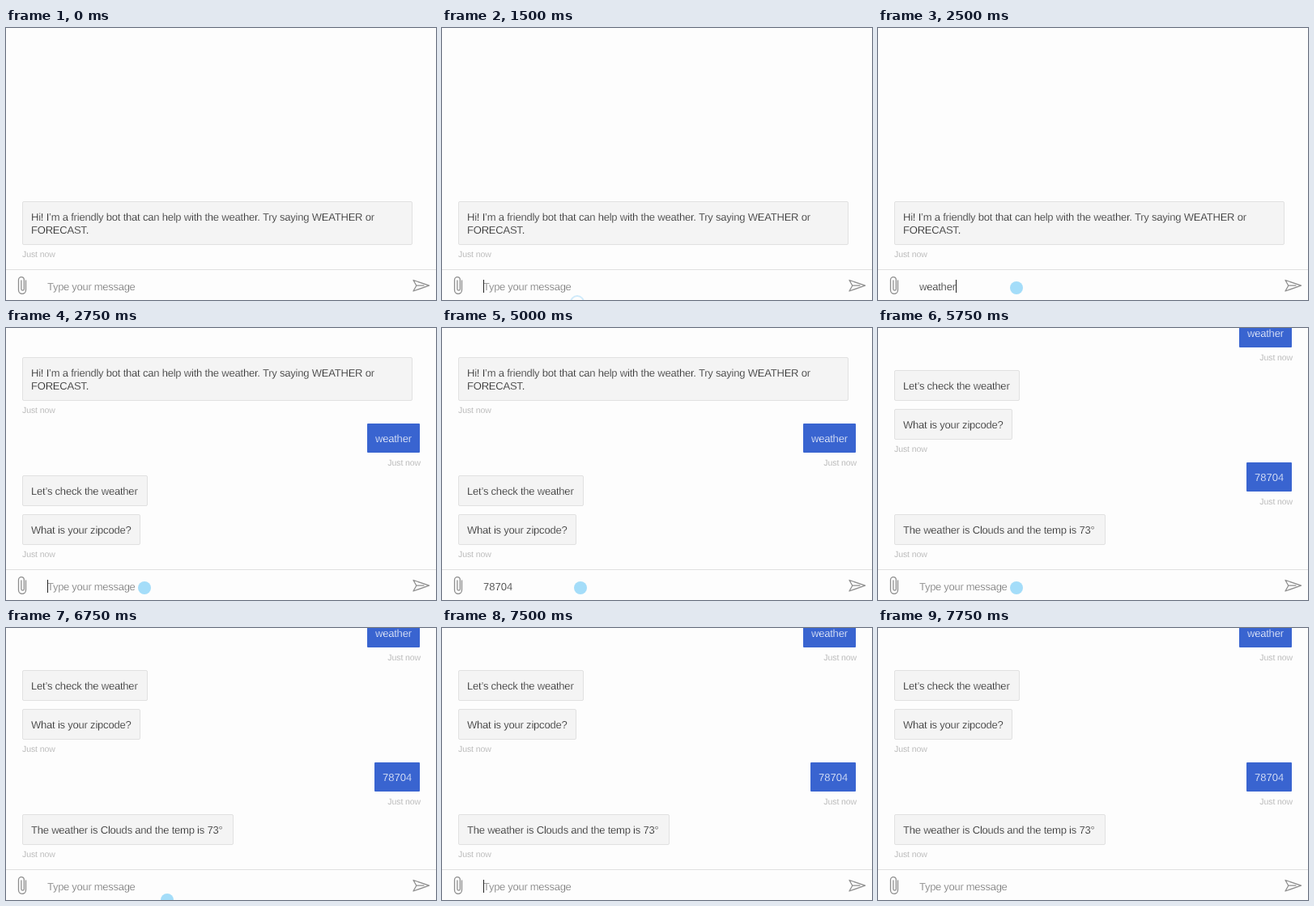
These frames come from a looping animation (531 by 336 pixels, 9250 ms). An HTML page:

```html
<!DOCTYPE html>
<html lang="en">
<head>
<meta charset="utf-8">
<title>Weather bot chat</title>
<style>
  html, body { margin: 0; width: 100%; height: 100%; overflow: hidden; background: #fdfdfd; }
  svg { display: block; }
  /* A thin stroke in the backdrop colour gives the letters a light weight. */
  text {
    font: 13px "Liberation Sans", Arial, sans-serif;
    letter-spacing: -.21px;
    text-rendering: geometricPrecision;
    fill: #262626;
    stroke: #f4f4f4;
    stroke-width: .25px;
  }
  .digits { letter-spacing: 0; }
  .time { font-size: 10.5px; letter-spacing: -.1px; fill: #a2a2a2; stroke: #fdfdfd; }
  .right { text-anchor: end; }
  .bot { fill: #f4f4f4; stroke: #e1e1e1; }
  .user { fill: #3964d0; }
  .userText { fill: #fff; stroke: #3964d0; }
  #input { stroke: #fdfdfd; }
  .hint { fill: #747474; letter-spacing: -.29px; }
  .icon { fill: none; stroke: #8e8e8e; stroke-width: 1.3; stroke-linejoin: round; stroke-linecap: round; }
</style>
</head>
<body>
<svg width="531" height="336" viewBox="0 0 531 336">
  <g id="chat"></g>
  <rect y="298" width="531" height="38" fill="#fdfdfd"/>
  <rect y="298" width="531" height="1" fill="#e0e0e0"/>
  <path class="icon" d="M24.5 312V323.8a4.5 4.5 0 0 1-9 0V311a3.4 3.4 0 0 1 6.8 0V322.5a1.7 1.7 0 0 1-3.4 0V312"/>
  <path class="icon" d="M503 311.5L522.5 318.2L503 325L506.8 318.2ZM506.8 318.2H516"/>
  <text id="input" x="51" y="324"></text>
  <rect id="caret" y="311" width="1" height="16" fill="#222"/>
  <circle id="dot"/>
</svg>
<script>
const LOOP = 9250;
const byId = id => document.getElementById(id);
const [chat, input, caret, dot] = ['chat', 'input', 'caret', 'dot'].map(byId);

function add(parent, tag, attrs, content = '') {
  const node = document.createElementNS('http://www.w3.org/2000/svg', tag);
  for (const key in attrs) node.setAttribute(key, attrs[key]);
  node.textContent = content;
  parent.append(node);
  return node;
}

const group = start => Object.assign(add(chat, 'g', {}), { start });

function botBubble(parent, y, width, lines) {
  add(parent, 'rect', { class: 'bot', x: 20.5, y: y + .5, width: width - 1, height: 21 + 16 * lines.length, rx: 1.5 });
  lines.forEach((line, i) => add(parent, 'text', { x: 31, y: y + 24 + 16 * i }, line));
}

function userBubble(parent, y, width, line, kind = '') {
  add(parent, 'rect', { class: 'user', x: 511 - width, y, width, height: 36, rx: 1 });
  add(parent, 'text', { class: 'userText ' + kind, x: 521 - width, y: y + 23 }, line);
}

const botTime = (parent, y) => add(parent, 'text', { class: 'time', x: 20, y }, 'Just now');
const userTime = (parent, y) => add(parent, 'text', { class: 'time right', x: 512, y }, 'Just now');

const greeting = group(0);
botBubble(greeting, 36, 482, ['Hi! I’m a friendly bot that can help with the weather. Try saying WEATHER or', 'FORECAST.']);
botTime(greeting, 105);

const question = group(2750);
userBubble(question, 118, 65, 'weather');
userTime(question, 170);
botBubble(question, 182, 155, ['Let’s check the weather']);
botBubble(question, 230, 146, ['What is your zipcode?']);
botTime(question, 283);

const zip = group(5250);
userBubble(zip, 296, 56, '78704', 'digits');
const status = userTime(zip, 348);

const answer = group(5750);
botBubble(answer, 360, 261, ['The weather is Clouds and the temp is 73°']);
botTime(answer, 413);

// Each track lists [start in ms, value]; a value holds until the next one.
const scrollTrack = [[0, -178], [2750, 0], [5250, 65], [5750, 130]];
const typedTrack = [
  [0, ''], [1750, 'we'], [2000, 'wea'], [2250, 'weath'], [2500, 'weather'],
  [2750, ''], [4250, '7870'], [4500, '78704'], [5250, '']
];
const caretTrack = [
  [0, false], [1250, true], [3250, false], [3750, true], [5000, false], [5250, true],
  [5750, false], [6250, true], [6750, false], [7250, true], [7750, false]
];
const dotTrack = [
  [0, null], [250, [240, 206]], [500, [172, 337]], [750, [172, 324]], [1000, [166, 338]],
  [1500, [167, 339, 'ring']], [1750, null], [2000, [171, 321]], [6750, [199, 336]], [7000, null]
];
const valueAt = (track, t) => track.findLast(([start]) => start <= t)[1];
const show = (node, visible) => node.setAttribute('visibility', visible ? 'visible' : 'hidden');

function draw(t) {
  chat.setAttribute('transform', `translate(0 ${-valueAt(scrollTrack, t)})`);
  for (const part of chat.children) show(part, t >= part.start);
  status.textContent = t < 5750 ? 'Sending' : 'Just now';

  const typed = valueAt(typedTrack, t);
  input.textContent = typed || 'Type your message';
  input.setAttribute('class', !typed ? 'hint' : /^\d/.test(typed) ? 'digits' : '');
  caret.setAttribute('x', 51 + (typed ? Math.round(input.getComputedTextLength()) : 0));
  show(caret, valueAt(caretTrack, t));

  const spot = valueAt(dotTrack, t);
  show(dot, spot);
  if (spot) {
    const [cx, cy, ring] = spot;
    const look = { cx, cy, r: 8, fill: ring ? '#fdfdfd' : '#a4ddf9', stroke: ring ? '#cfeafa' : 'none', 'stroke-width': 2 };
    for (const key in look) dot.setAttribute(key, look[key]);
  }
}

const begin = performance.now();
function tick() {
  draw((performance.now() - begin) % LOOP);
  requestAnimationFrame(tick);
}
tick();
</script>
</body>
</html>
```
